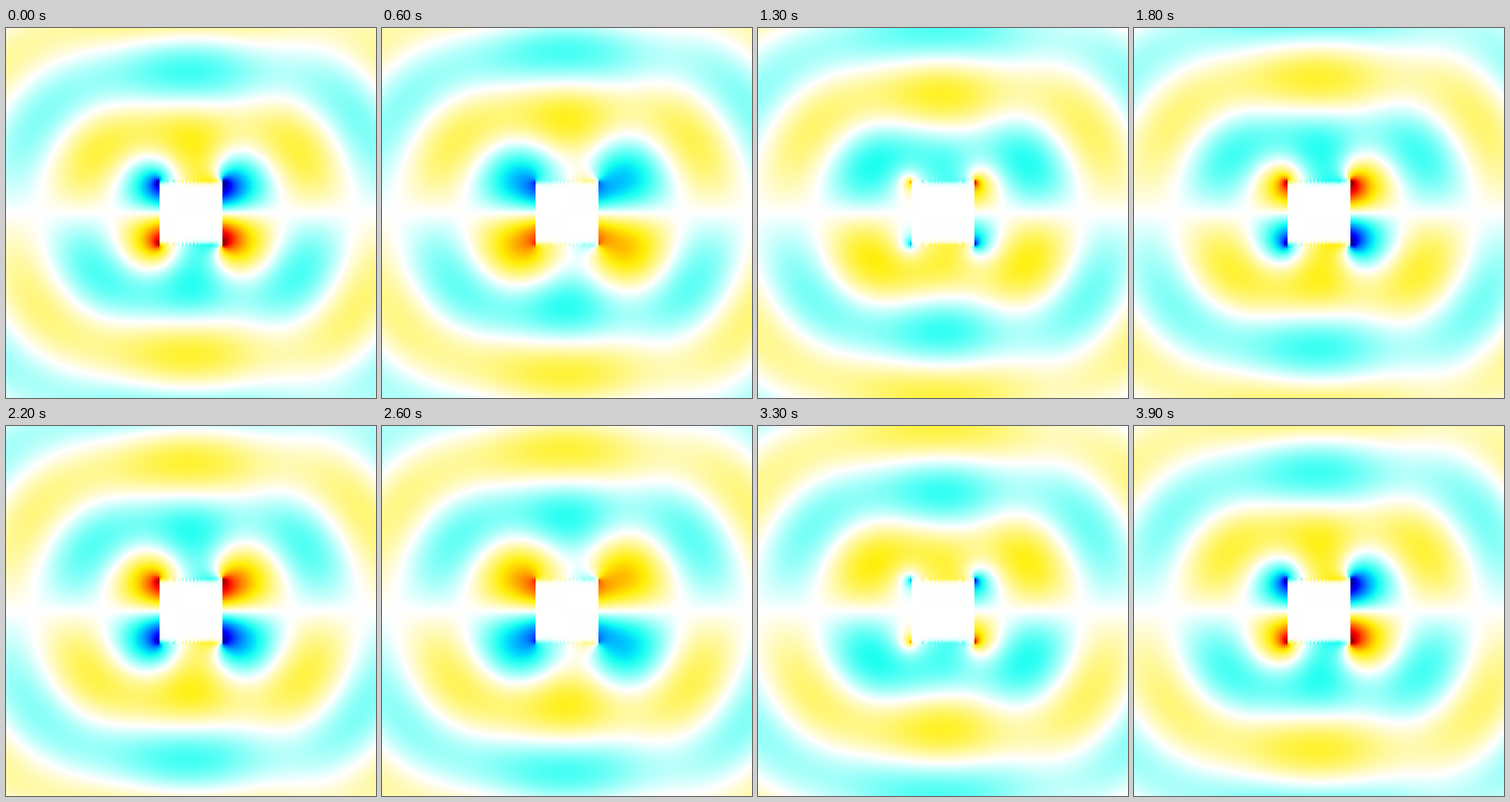
A matplotlib script for the animation above (4 s loop, 400 by 400 pixels).

```python
"""Plane wave scattered by a metal square: transverse electric field."""
import numpy as np
import matplotlib.pyplot as plt
from matplotlib.animation import FuncAnimation
from matplotlib.colors import LinearSegmentedColormap

SIZE, CELL = 400, 2
FRAMES, INTERVAL = 40, 100
K = 2 * np.pi / (SIZE / 3)      # three wavelengths across the stage
HALF = 33.99                    # half side of the square, just inside the cells
PANELS = 80                     # boundary panels per side
IMPEDANCE = 0.03 - 0.3j         # surface impedance of the metal
SKIN = 2                        # visible depth of the field in the metal


def hankel(n, x, terms=50):
    """Hankel function of the first kind, order 0 or 1, from its series."""
    j = np.zeros_like(x)
    tail = np.zeros_like(x)
    term = (x / 2) ** n
    psi = n - 2 * np.euler_gamma
    for m in range(1, terms):
        j += term
        tail += psi * term
        term = -term * (x / 2) ** 2 / (m * (m + n))
        psi += 1 / m + 1 / (m + n)
    y = (2 * np.log(x / 2) * j - n * 2 / x - tail) / np.pi
    return j + 1j * y


# Smooth parts of the wave kernels, tabulated over distance.
table_x = np.linspace(1e-6, 17, 6000)
double_smooth = 0.5j * np.pi * table_x * hankel(1, table_x)
single_smooth = 0.25j * hankel(0, table_x) + np.log(table_x) / (2 * np.pi)

# The outline runs counterclockwise, with panels finer towards the corners.
side = HALF - 1j * HALF * np.cos(np.linspace(0, np.pi, PANELS + 1))
start = np.concatenate([side[:-1] * 1j ** m for m in range(4)])
end = np.concatenate([side[1:] * 1j ** m for m in range(4)])
mid = (start + end) / 2
length = abs(end - start)
tangent = (end - start) / length


def layers(z):
    """Potentials at points z of unit double and single layers per panel."""
    z = z[:, None]
    a, b = (start - z) / tangent, (end - z) / tangent
    dist = K * abs(mid - z)
    angle = -np.angle(b * np.conj(a))
    double = np.interp(dist, table_x, double_smooth) * angle / (2 * np.pi)
    log_part = (b * np.log(b) - a * np.log(a)).real + length * (np.log(K) - 1)
    single = (length * np.interp(dist, table_x, single_smooth)
              - log_part / (2 * np.pi))
    return double, single


def scattered_field():
    """Complex amplitude of the horizontal electric field on the cell grid."""
    coupling = 1j * K * IMPEDANCE
    double, single = layers(mid)
    np.fill_diagonal(double, 0)
    matrix = 0.5 * np.eye(len(mid)) - double - coupling * single
    surface = np.linalg.solve(matrix, np.exp(1j * K * mid.real))

    edge = SIZE // 2
    xs = np.arange(-edge + CELL / 2, edge, CELL)
    magnetic = []
    for y in np.arange(-edge, 1, CELL):
        double, single = layers(xs + 1j * y)
        magnetic.append((double + coupling * single) @ surface)
    top = np.diff(magnetic, axis=0)

    # Only a thin skin of the field enters the metal.
    inside = abs(xs) < HALF
    first = int((edge - HALF) // CELL)
    depth = np.arange(len(top) - first)[:, None] * CELL + 1
    top[first:, inside] = top[first - 1, inside] * np.exp(-depth / SKIN)

    # Face the square so that the right-hand side leads in phase.
    left, right = top[60:95, 20:75], top[60:95, ::-1][:, 20:75]
    if np.vdot(left, right).imag > 0:
        top = top[:, ::-1]

    # A rising zero sits above the square at the start of the loop.
    zero = top[40:42, 99:101].mean()
    lobe = abs(top[61, 99:101].mean())
    top = top * 1j * abs(zero) / zero * 0.28 / lobe
    return np.vstack([top, -top[::-1]])


STOPS = [
    (-1, (0, 0, 150)), (-0.75, (0, 0, 255)), (-0.38, (0, 215, 255)),
    (-0.3, (22, 255, 241)), (0, (255, 255, 255)), (0.3, (255, 239, 6)),
    (0.38, (255, 205, 0)), (0.75, (255, 0, 0)), (1, (150, 0, 0)),
]
cmap = LinearSegmentedColormap.from_list(
    "wave", [((v + 1) / 2, [c / 255 for c in rgb]) for v, rgb in STOPS], N=1024)

field = scattered_field()

fig = plt.figure(figsize=(4, 4), dpi=100)
ax = fig.add_axes([0, 0, 1, 1])
ax.axis("off")
image = ax.imshow(field.real, cmap=cmap, vmin=-1, vmax=1,
                  interpolation="nearest", aspect="auto")


def update(frame):
    phase = 2 * np.pi * frame / FRAMES
    image.set_data((field * np.exp(-1j * phase)).real)
    return (image,)


anim = FuncAnimation(fig, update, frames=FRAMES, interval=INTERVAL,
                     repeat=True, repeat_delay=0, blit=False)
plt.show()
```
